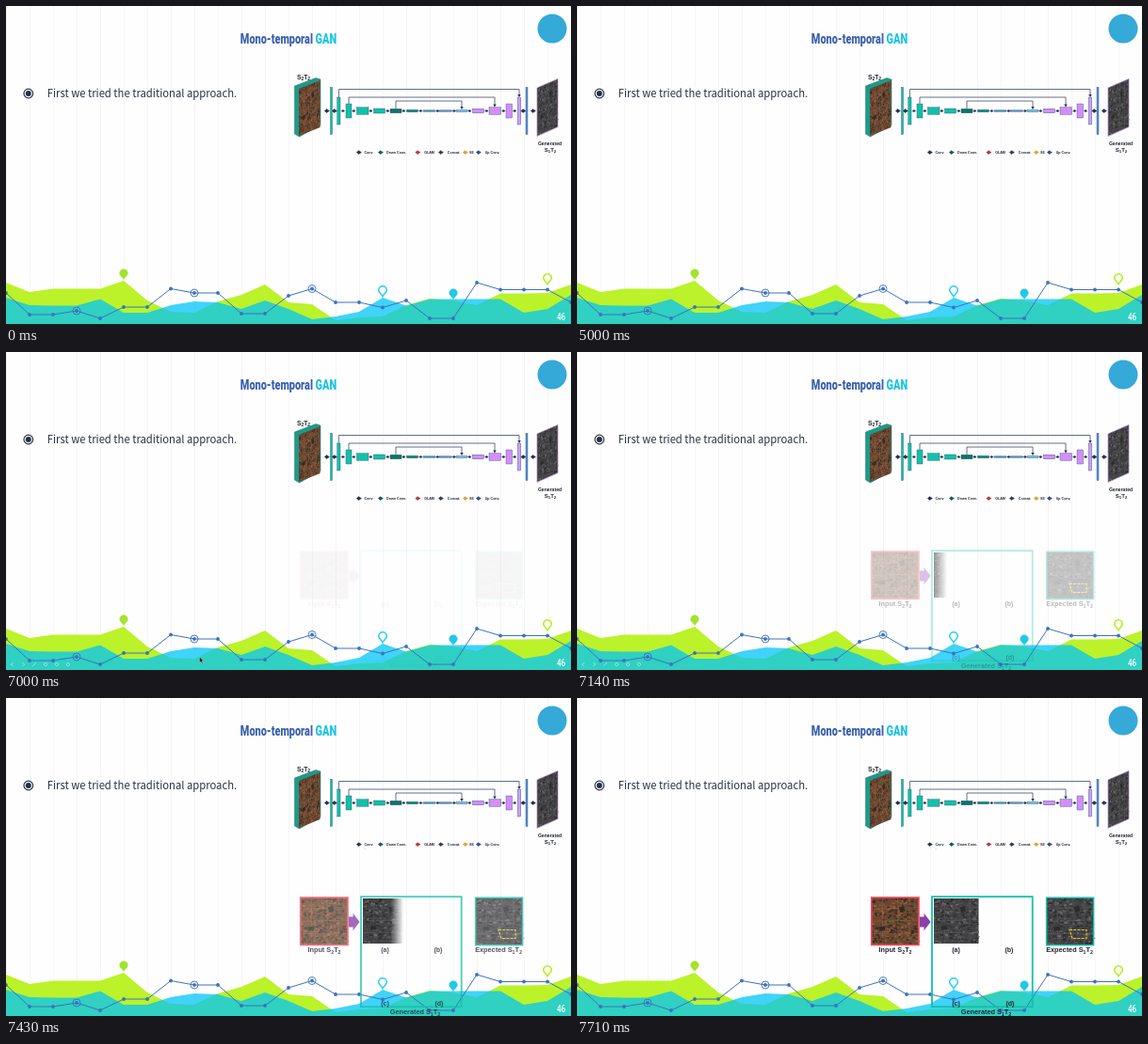
Write an HTML page that moves like this. It is 600 px wide and 338 px high and loops after 8000 ms.

```html
<!DOCTYPE html>
<html lang="en">
<head>
<meta charset="utf-8">
<title>Mono-temporal GAN</title>
<style>
  html, body { margin: 0; width: 100%; height: 100%; overflow: hidden; background: #fff; }
  svg { display: block; width: 100vw; height: 100vh; }
  .label { font: bold 7px "Liberation Sans", Arial, sans-serif; text-anchor: middle; fill: #20242c; }
  .condensed { font-family: Roboto, sans-serif; font-weight: 800; text-anchor: middle; }
  .body { font: 11.26px "Noto Sans CJK JP", "Noto Sans CJK SC", "Noto Sans", sans-serif; fill: #27303f; }
</style>
</head>
<body>
<svg id="stage" viewBox="0 0 600 338"></svg>
<script>
const LOOP = 8000;
const TEAL = '#14bfa8', NAVY = '#263048', BLUE = '#3c72bd', CYAN = '#2ccff0', LIME = '#bbf22a';
const clamp = v => Math.max(0, Math.min(1, v));

function seeded(seed) {
  return () => (seed = (seed * 16807) % 2147483647) / 2147483647;
}

const rect = (x, y, w, h, fill, more = '') =>
  `<rect x="${x}" y="${y}" width="${w}" height="${h}" fill="${fill}" ${more}/>`;
const path = (d, fill, more = '') => `<path d="${d}" fill="${fill}" ${more}/>`;
const circle = (x, y, r, fill, more = '') =>
  `<circle cx="${x}" cy="${y}" r="${r}" fill="${fill}" ${more}/>`;

// "_2" in the text becomes a subscript 2.
function label(x, y, text, size = 7) {
  const drop = size * 0.22;
  const spans = text.replace(/_(.)([^_]*)/g, (_, sub, rest) =>
    `<tspan dy="${drop}" font-size="${size * 0.72}">${sub}</tspan>` +
    (rest ? `<tspan dy="${-drop}">${rest}</tspan>` : ''));
  return `<text class="label" x="${x}" y="${y}" style="font-size:${size}px">${spans}</text>`;
}

// Aerial view, drawn in a 50 by 50 box: small roofs, streets and a dark patch.
function aerial(seed, base, tones, road) {
  const rnd = seeded(seed);
  let out = rect(0, 0, 50, 50, base);
  for (let i = 0; i < 330; i++) {
    const x = rnd() * 48, y = rnd() * 48, tone = tones[Math.floor(rnd() * tones.length)];
    out += rect(x.toFixed(1), y.toFixed(1), (1 + rnd() * 2.6).toFixed(1), (0.7 + rnd() * 1.8).toFixed(1), tone);
  }
  out += path('M0 12.5L50 10M0 25L50 23.5M0 38H50M12 0V50M28.5 0V50M40 0V50', 'none',
    `stroke="${road}" stroke-width=".6" opacity=".55"`);
  return out + path('M29 10L34 9L36 14L31 16ZM8 31L14 30L15 34L9 35Z', tones[0]);
}
const town = aerial(71, '#6b452f', ['#332b23', '#8a5638', '#57503a', '#965f40', '#432d20'], '#a5805f');
const radar = aerial(137, '#434345', ['#2b2b2d', '#58585a', '#38383a', '#6c6c6e', '#313133'], '#6c6c6e');
const place = (art, matrix) => `<g transform="matrix(${matrix})">${art}</g>`;

function grid() {
  let d = '';
  for (let x = 0; x <= 600; x += 25) d += `M${x + 0.5} 0V338`;
  return path(d, 'none', 'stroke="#f5f5f9"');
}

const STEP = 25;
const toLine = ys => 'M' + ys.map((y, i) => `${i * STEP} ${y}`).join('L');
const area = (ys, fill, opacity) => path(toLine(ys) + 'V338H0Z', fill, `opacity="${opacity}"`);

function pin(x, y, color, open) {
  return path(`M${x - 4.3} ${y}a4.3 4.3 0 1 1 8.6 0c0 2.6-2.8 3.8-4.3 6.6c-1.5-2.8-4.3-4-4.3-6.6Z`,
    open ? '#fff' : color, `stroke="${color}" stroke-width="${open ? 1.6 : 0.5}"`);
}

function landscape() {
  const lime = [294, 304, 300.5, 300.5, 300.5, 292, 313, 325, 326, 314, 307, 296, 315, 317, 334,
    331, 330, 318, 311, 313, 318, 305.5, 305.5, 305, 296];
  const cyan = [310, 318, 318.5, 318.5, 311.5, 326, 326, 318, 314, 315, 322, 313, 322, 333, 330,
    325, 310, 318.5, 311.5, 311.5, 311.5, 311.5, 326, 322, 307];
  const line = [305, 328, 328, 324, 332, 320, 320, 300.5, 305, 305, 327, 327, 308, 300.5, 315,
    315, 320.5, 313, 332, 332, 294, 301.5, 301.5, 301.5, 315];
  const rings = [3, 8, 13];
  return area(lime, LIME, 1) + area(cyan, '#00c6f8', 0.74) +
    path(toLine(line), 'none', `stroke="${BLUE}" stroke-width="1"`) +
    line.map((y, i) => (rings.includes(i)
      ? circle(i * STEP, y, 4, 'none', `stroke="${BLUE}" stroke-width=".9"`) : '') +
      circle(i * STEP, y, 1.9, BLUE)).join('') +
    pin(125, 284, '#a4e32b') + pin(575, 289, '#b4ee1e', true) +
    pin(400, 302, CYAN, true) + pin(475, 305, '#22c8e6');
}

function smallArrow(x, y, color, size = 1) {
  const d = 'M-2.6 0h3M-.6 -1.9l3 1.9l-3 1.9l-1.8-1.9Z';
  return path(d, color, `stroke="${color}" stroke-width=".6" transform="translate(${x} ${y}) scale(${size})"`);
}

function network() {
  const mid = 111.5;
  // x, width, height, fill
  const blocks = [
    [344.5, 2, 50, TEAL], [351.8, 3.2, 29, TEAL], [361, 6, 15, TEAL], [372.5, 12.5, 7.5, TEAL],
    [390.5, 12, 5, TEAL], [408, 12, 4.5, '#0b7468'], [425.5, 12, 2.6, '#108c83'],
    [443, 13, 1.4, '#3995b4'], [460, 13.5, 1.4, '#5c8fd0'], [478, 12, 2.4, '#7fc4ef'],
    [495.5, 12, 4.6, '#d48dfa'], [513, 12.5, 7.5, '#d48dfa'], [531, 6.5, 15, '#d48dfa'],
    [543.3, 3.4, 29, '#cf9df6'], [552, 2, 50, '#5b8fdc']
  ];
  const wide = [341, 349, 549.5, 560];
  const tight = [358, 369.5, 387.5, 405.5, 422.5, 440.5, 458.5, 476, 492.5, 510.5, 528.5, 540.3];
  // from x, from y, top y, to x, to y
  const skips = [[353.4, 97, 88.5, 545, 97], [364, 104, 97, 519, 107.5], [414, 109, 101, 484, 110]];
  const legend = [[375, 385, 'Conv', NAVY], [398, 414.5, 'Down Conv.', '#0b5d50'], [437.5, 449.5, 'GLAM', '#b82f3a'],
    [462, 475.5, 'Concat.', '#333a60'], [488, 494.5, 'SE', '#e0a03a'], [502, 516.5, 'Up Conv.', '#2c4d8a']];

  return path('M306.5 85L329 76.5L334 78V126.5L311.5 139L306.5 136Z', '#1c9a8a', 'stroke="#14776c" stroke-width=".5"') +
    place(town, '.45,-.18,0,1,311,88') +
    place(radar, '.44,-.19,0,1.02,564,87') +
    path('M564 87L586 77.5V128.5L564 138.5Z', 'none', 'stroke="#a77fc0" stroke-width=".7"') +
    skips.map(([x, y, top, x2, y2]) =>
      path(`M${x} ${y}V${top}H${x2}V${y2 - 2}`, 'none', 'stroke="#3d4a66" stroke-width=".8"') +
      path(`M${x2 - 1.7} ${y2 - 3}h3.4l-1.7 3Z`, NAVY)).join('') +
    blocks.map(([x, w, h, fill]) =>
      rect(x, mid - h / 2, w, h, fill, 'stroke="#24506e" stroke-width=".4"')).join('') +
    wide.map(x => smallArrow(x, mid, NAVY)).join('') +
    tight.map(x => smallArrow(x, mid, NAVY, 0.7)).join('') +
    legend.map(([x, tx, text, color]) => smallArrow(x, 155.6, color) + label(tx, 157, text, 3.65)).join('') +
    label(381, 161, '.', 3.65) +
    label(316, 77.5, 'S_2T_2', 6.8) + label(577.5, 148, 'Generated', 5.1) + label(578, 155, 'S_1T_2', 6);
}

function results() {
  return place(town, '1.02,0,0,1.02,312,212') +
    rect(312.7, 212, 50.3, 50.5, 'none', 'stroke="#ef4b5f" stroke-width="1.6"') +
    path('M364 232.5H368.5V228.8L375.5 238L368.5 247.2V243.5H364Z', '#8c3fae') +
    rect(377, 211.2, 106.7, 117, 'none', `stroke="${TEAL}" stroke-width="1.8"`) +
    place(radar, '1.02,0,0,1.02,498,212') +
    rect(498.6, 212.2, 50, 50.5, 'none', `stroke="${TEAL}" stroke-width="1.5"`) +
    path('M523 246.5H541V255.5H526Z', 'none', 'stroke="#e8c52a" stroke-width="1.1" stroke-dasharray="3 1.2"') +
    label(338, 270, 'Input S_2T_2', 7.3) + label(523, 270, 'Expected S_1T_2', 7.3) +
    label(402.5, 270, '(a)', 7) + label(459, 270, '(b)', 7) +
    label(402.5, 327, '(c)', 7) + label(460, 327, '(d)', 7) +
    label(434.5, 336, 'Generated S_1T_2', 7.3);
}

function controls() {
  let out = path('M8 330l-3 2l3 2M17 330l3 2l-3 2M28 334l4-4', 'none', 'stroke="#fff" stroke-width=".8"');
  for (const x of [42, 54, 66]) out += circle(x, 332, 1.6, 'none', 'stroke="#fff" stroke-width=".8"');
  return out;
}

document.getElementById('stage').innerHTML = `
  <defs>
    <linearGradient id="soft"><stop stop-color="#fff"/><stop offset="1" stop-color="#000"/></linearGradient>
    <mask id="wipe" maskUnits="userSpaceOnUse" x="370" y="205" width="70" height="65">
      <rect id="solid" x="370" y="205" height="65" fill="#fff"/>
      <rect id="edge" y="205" width="14" height="65" fill="url(#soft)"/>
    </mask>
  </defs>
  ${rect(0, 0, 600, 338, '#fefeff')}${grid()}
  <text class="condensed" transform="translate(300 39.5) scale(.78 1)" font-size="14" fill="#3a61ad"
    >Mono-temporal <tspan fill="#19c4e6">GAN</tspan></text>
  ${circle(580, 24, 15.5, '#35a9d8')}
  ${circle(23.8, 93, 4.8, 'none', `stroke="${NAVY}" stroke-width="1.2"`)}${circle(23.8, 93, 3, NAVY)}
  <text class="body" x="43.8" y="97.4">First we tried the traditional approach.</text>
  ${network()}
  ${landscape()}
  <text class="condensed" transform="translate(589.6 333.8) scale(.75 1)" font-size="10.8" fill="#fff"
    style="font-weight:500">46</text>
  <g id="controls">${controls()}</g>
  <g id="results">${results()}</g>
  <g mask="url(#wipe)"><g id="generated">${place(radar, '.95,0,0,.96,379,213')}</g></g>
  <g id="cursor">${path('M0 0V6.2L1.5 4.9L2.6 7L3.5 6.5L2.5 4.5H4.3Z', '#1b1b1b', 'stroke="#fff" stroke-width=".3"')}</g>`;

const part = id => document.getElementById(id);
const fade = (id, opacity) => part(id).setAttribute('opacity', opacity);

const REFRESH = [0, 6000, 6430, 6570, 6860, 7000, 7140, 7290, 7430, 7570, 7710];

function draw(time) {
  const t = REFRESH.filter(r => r <= time).pop();
  const shown = t < 7000 ? 0 : clamp(0.04 + ((t - 7000) / 600) ** 0.9);
  fade('results', shown);
  fade('generated', t < 7000 ? 0 : clamp(shown + 0.25));

  const edge = 377 + (t - 7000) * 0.1 - 12;
  part('solid').setAttribute('width', Math.max(0, edge - 370));
  part('edge').setAttribute('x', edge);

  fade('controls', t < 6000 ? 0 : 0.5 * clamp((7430 - t) / 280));
  const cursorY = t < 6570 ? 332 : t < 6860 ? 321 : 324;
  part('cursor').setAttribute('transform', `translate(205.5 ${cursorY})`);
  fade('cursor', t >= 6430 && t < 7140 ? 1 : 0);
}

const start = performance.now();
function tick() {
  draw((performance.now() - start) % LOOP);
  requestAnimationFrame(tick);
}
tick();
</script>
</body>
</html>
```
